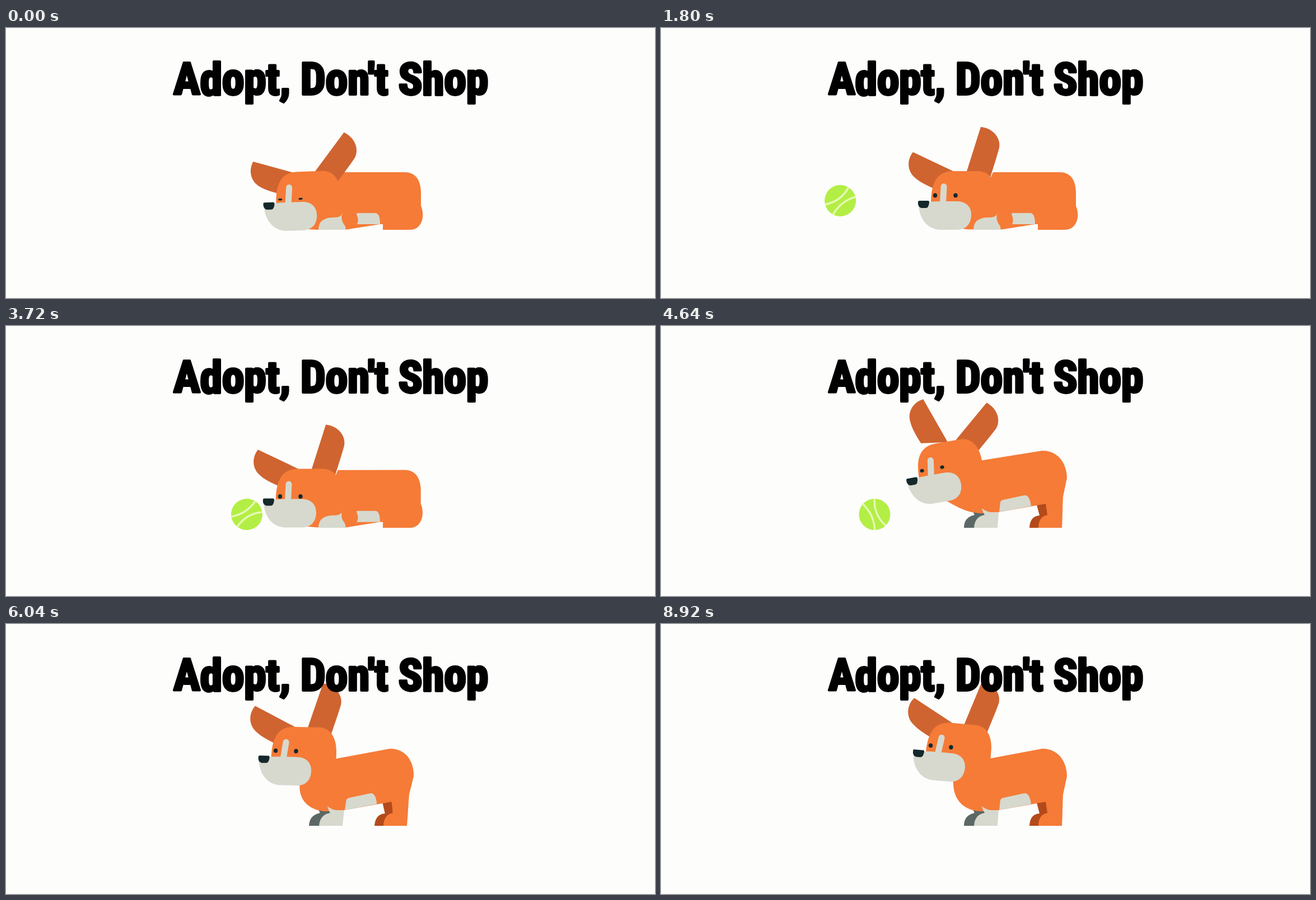
Recreate the animation shown at these times as an HTML page. Size 1159x483 px, loop 8.96 s.

```html
<!DOCTYPE html>
<html lang="en">
<head>
<meta charset="utf-8">
<title>Corgi and ball</title>
<style>
  html, body { margin: 0; width: 100%; height: 100%; overflow: hidden; background: #fdfdfc; }
  svg { display: block; width: 100%; height: 100%; }
  .coat { fill: #f57b37; }
  .ear { fill: #cf6430; }
  .pale { fill: #d7d9ce; }
  .ink { fill: #14282b; }
  text {
    font: 700 80px "Roboto Condensed", "Open Sans Condensed", Roboto, "Open Sans", sans-serif;
    font-stretch: 75%;
    letter-spacing: -.005em;
    text-anchor: middle;
    stroke: #000;
    stroke-width: 4px;
    stroke-linejoin: round;
  }
</style>
</head>
<body>
<svg viewBox="0 0 1159 483">
  <g id="torso">
    <path id="farFront" fill="#5c6866" d="M541 361 Q541 342 560 338 L555 328 H579 L576 361 Z"/>
    <path id="farRear" fill="#b34a1b" d="M658 361 Q659 340 676 339 L670 316 L690 312 V361 Z"/>
    <path id="body" class="coat"/>
    <path id="belly" class="pale"/>
    <path id="nearFront" class="pale"/>
    <path id="paw" class="coat" d="M601 331 H625 Q637 354 611 360 Q595 345 601 331 Z"/>
  </g>
  <g id="head">
    <path id="earL" class="ear" d="M450 222 L530 260 L492 289 Q465 278 455 269 C440 258 438 237 450 222 Z"/>
    <path id="earR" class="ear" d="M571 177 C592 179 607 196 604 214 Q602 223 588 267 L543 266 Z"/>
    <path class="coat" d="M482 314 C482 278 492 256 522 256 H566 C588 256 598 276 598 300 V315 Q585 345 535 350 Z"/>
    <rect id="blaze" class="pale" x="498" y="278" width="11" height="38" rx="5.5"/>
    <path class="pale" d="M460 316 Q468 310 500 310 H528 C545 310 554 320 554 334 C554 350 545 361 528 361 H500 C475 361 461 340 460 316 Z"/>
    <path class="ink" d="M459 311 Q459 309 462 309 H477 Q479 309 479 312 Q478 322 473 322 H465 Q458 320 459 311 Z"/>
    <ellipse id="eyeL" class="ink" cx="489.5" rx="3.7"/>
    <ellipse id="eyeR" class="ink" cx="526" rx="3.7"/>
  </g>
  <g id="ball">
    <circle r="28" fill="#b3ee45"/>
    <path d="M-26 -10 Q0 -1 25 -13 M-26 11 Q0 -2 26 10" fill="none" stroke="#e6f9b4" stroke-width="3.5"/>
  </g>
  <text id="slogan" x="580" y="119">Adopt, Don't Shop</text>
</svg>
<script>
const LOOP = 8960;
const $ = id => document.getElementById(id);
const set = (id, name, value) => $(id).setAttribute(name, value);
const lerp = (a, b, k) => a + (b - a) * k;
const smooth = k => k * k * (3 - 2 * k);

// Alternating times and values; holds the end values outside the range.
const track = (ease, ...keys) => t => {
  if (t <= keys[0]) return keys[1];
  for (let i = 2; i < keys.length; i += 2) {
    if (t < keys[i]) {
      const k = (t - keys[i - 2]) / (keys[i] - keys[i - 2]);
      return lerp(keys[i - 1], keys[i + 1], ease(k));
    }
  }
  return keys[keys.length - 1];
};

const headX = track(smooth, 3680, 526, 4280, 519, 4640, 502, 4840, 502, 5420, 518);
const headY = track(smooth, 640, 300, 1000, 299, 3680, 299, 4280, 257, 4640, 252, 4840, 252,
  5420, 226, 5720, 217, 6040, 227, 6400, 227, 7100, 220);
const tilt = track(smooth, 640, -2, 1000, 0, 3680, 0, 4640, -10, 4840, -9, 5720, 3, 6040, 1.5, 6400, 1.5, 7100, 5);
const earL = track(smooth, 640, -8, 1000, 0, 3680, 0, 4640, 45, 4840, 38, 5420, 4, 6040, 1, 6400, 1, 7100, 3);
const earR = track(smooth, 640, 21, 1000, 0, 3680, 0, 4640, 32, 4840, 28, 5420, 4, 6040, 0);
const gaze = track(smooth, 640, 5, 1000, 0, 2100, 0, 2700, 6, 3680, 6, 4640, 0);
const lids = track(smooth, 640, .45, 1000, 1, 4280, 1, 4640, .8, 4840, 1);
const lean = track(smooth, 640, 5, 1000, 3, 3680, 3, 4640, 8);
const standing = track(smooth, 3680, 0, 4280, 1);
const sway = track(smooth, 5420, 0, 6040, -2, 6400, -2, 7100, 0);
const roll = track(k => k, 2900, 444.5, 3680, 430, 4480, 430, 4560, 412, 4640, 382, 5480, -40);

function morph(from, to, k) {
  const goal = to.match(/[\d.]+/g);
  let n = 0;
  return from.replace(/[\d.]+/g, v => lerp(+v, +goal[n++], k).toFixed(2));
}

// Rump and legs morph; the neck follows the head.
function bodyPath(x, y, k) {
  const trunk = morph(
    'C550 361 560 361 580 361 L605 361 L668 351 L673 351 Q673 354 673 361 L722 361 C740 361 750 340 741 318 L741 292 C740 270 730 258 712 258',
    'C520 318 545 336 575 335 L603 333 L687 318 L690 338 Q674 341 674 361 L716 361 C717 345 717 325 718 305 L725 272 C724 240 705 223 681 223', k);
  return `M${x + 4} ${y + 59} ${trunk} L${x + 67} ${lerp(258, 241, k)} L${x + 55} ${y - 15} L${x - 5} ${y + 18} Z`;
}

const bellyPath = k => morph(
  'M625 351 L625 333 Q626 331 630 331 L660 331 Q668 332 668 351 Z',
  'M604 333 L606 315 Q607 312 611 311 L648 303 Q658 301 661 322 Z', k);

const legPath = k => morph(
  'M558 361 Q558 341 580 339 Q582 339 585 339 Q600 339 601 330 L607 361 Z',
  'M559 361 Q560 341 578 338 Q574 331 573 326 Q582 335 603 333 L601 361 Z', k);

// The ball drops in, bounces ever lower, then rolls to the nose.
const GRAVITY = .0025;
const FLOOR = 337;

function ballX(t) {
  const u = Math.max(0, (2760 - t) / 1000);
  return u ? 444.5 - 80 * u - 51.8 * u * u : roll(t);
}

function ballY(t) {
  let start = 1168;
  if (t < start) return 82 + GRAVITY / 2 * Math.max(0, t - 716) ** 2;
  for (const height of [90, 34, 12]) {
    const speed = Math.sqrt(2 * GRAVITY * height);
    const age = t - start;
    const span = 2 * speed / GRAVITY;
    if (age < span) return FLOOR - speed * age + GRAVITY / 2 * age * age;
    start += span;
  }
  return FLOOR;
}

function draw() {
  const t = performance.now() % LOOP;
  const x = headX(t), y = headY(t), k = standing(t), bx = ballX(t);

  set('body', 'd', bodyPath(x, y, k));
  set('belly', 'd', bellyPath(k));
  set('nearFront', 'd', legPath(k));
  set('paw', 'transform', `translate(${-16 * k} ${-48 * k})`);
  set('farFront', 'transform', `translate(${20 * (1 - k)})`);
  set('farRear', 'transform', `translate(${22 * (1 - k)})`);
  set('torso', 'transform', `translate(0 361) skewX(${sway(t)}) translate(0 -361)`);

  set('head', 'transform', `translate(${x} ${y}) rotate(${tilt(t)}) translate(-526 -299)`);
  set('earL', 'transform', `rotate(${earL(t)} 540 275)`);
  set('earR', 'transform', `rotate(${earR(t)} 558 281)`);
  set('blaze', 'transform', `rotate(${lean(t)} 502 314)`);
  for (const id of ['eyeL', 'eyeR']) {
    set(id, 'cy', 299.5 + gaze(t));
    set(id, 'ry', 3.9 * lids(t));
  }

  set('ball', 'transform', `translate(${bx} ${ballY(t)}) rotate(${(bx - 444.5) * 1.69 - 5})`);
  requestAnimationFrame(draw);
}

// Same line length whichever of the listed fonts is present.
const slogan = $('slogan');
slogan.style.fontSize = 80 * 562 / slogan.getComputedTextLength() + 'px';
draw();
</script>
</body>
</html>
```
